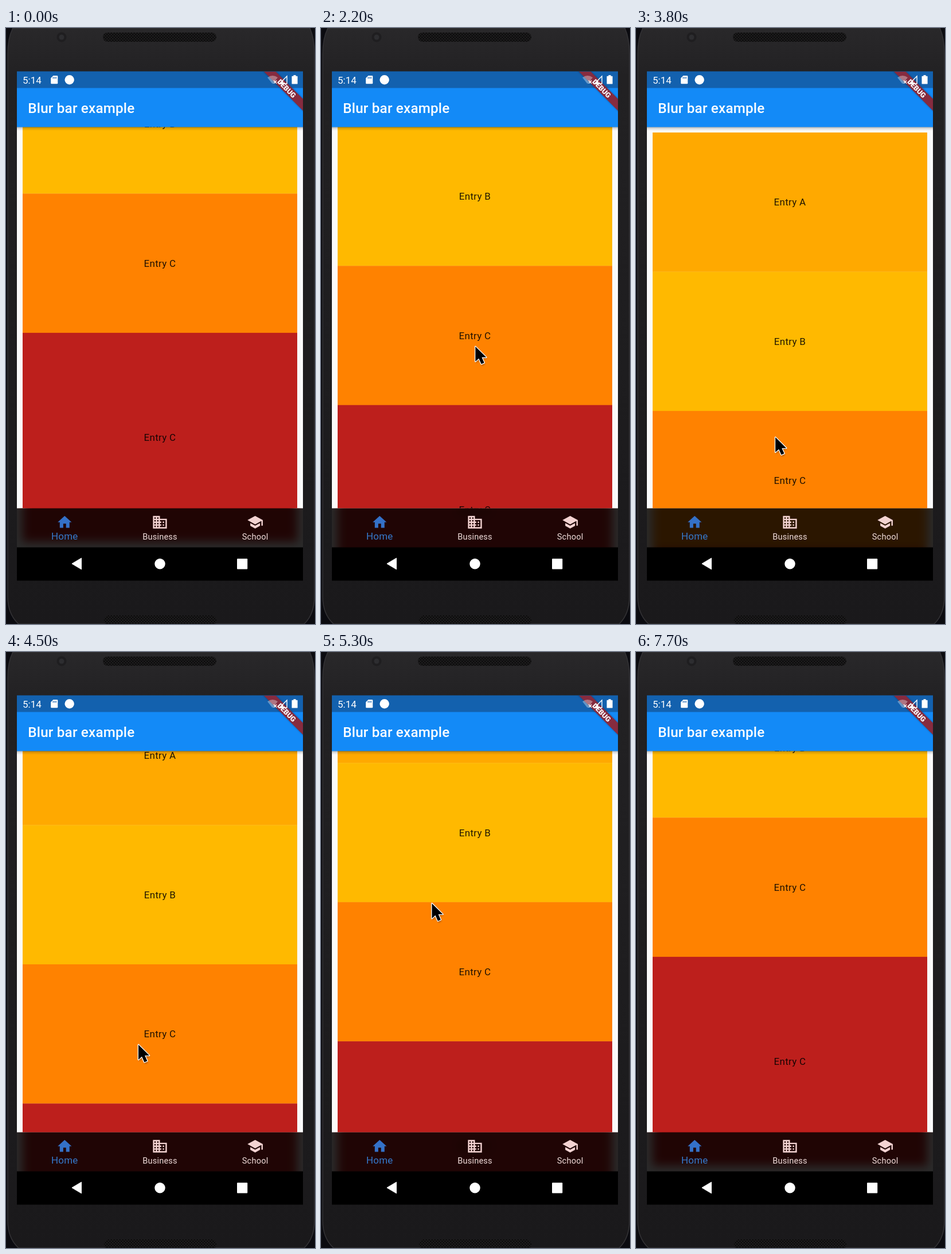
An HTML page that plays this animation: 539x1038 px, repeating every 7800 ms.

```html
<!DOCTYPE html>
<html lang="en">
<head>
<meta charset="utf-8">
<title>Blur bar example</title>
<style>
  html, body { margin: 0; width: 100%; height: 100%; overflow: hidden; background: #0b0b10; }
  svg { display: block; width: 539px; height: 1038px; font-family: Roboto, sans-serif; }
  .entry { font-size: 16.97px; letter-spacing: .3px; fill: #000; fill-opacity: .87; text-anchor: middle; }
  .label { font-size: 14.55px; letter-spacing: .22px; fill: #f0dcda; text-anchor: middle; }
  .label.active { font-size: 16.97px; fill: #3579cc; }
</style>
</head>
<body>
<svg viewBox="0 0 539 1038">
  <defs>
    <linearGradient id="shell" x2="0" y2="1">
      <stop offset="0" stop-color="#29282a"/>
      <stop offset=".08" stop-color="#222123"/>
      <stop offset=".9" stop-color="#1b1a1c"/>
      <stop offset="1" stop-color="#1a191b"/>
    </linearGradient>
    <linearGradient id="shade" x2="0" y2="1">
      <stop offset="0" stop-opacity=".34"/>
      <stop offset=".4" stop-opacity=".13"/>
      <stop offset="1" stop-opacity="0"/>
    </linearGradient>
    <pattern id="mesh" width="5" height="5" patternUnits="userSpaceOnUse">
      <rect width="5" height="5" fill="#1d1c1d"/>
      <circle cx="1.25" cy="1.25" r="1.2" fill="#080808"/>
      <circle cx="3.75" cy="3.75" r="1.2" fill="#080808"/>
    </pattern>
    <filter id="blur" filterUnits="userSpaceOnUse" x="-10" y="760" width="560" height="200" color-interpolation-filters="sRGB">
      <feGaussianBlur stdDeviation="8"/>
    </filter>
    <filter id="soft" x="-50%" y="-50%" width="200%" height="200%"><feGaussianBlur stdDeviation="1.5"/></filter>
    <clipPath id="page"><rect x="19" y="172" width="499" height="664.5"/></clipPath>
    <clipPath id="bar"><rect x="19" y="836.5" width="499" height="68.5"/></clipPath>
    <clipPath id="screen"><rect x="19" y="76" width="499" height="886"/></clipPath>
    <path id="arrow" d="M0 0V26L6 20.6 10.4 30.4 15.4 28.2 11.1 18.8H19Z"/>
  </defs>

  <rect width="539" height="1038" fill="#0b0b10"/>
  <path d="M12 0Q3 18 3 45V990Q3 1021 22 1038H520Q538 1021 538 990V45Q538 18 530 0Z" fill="url(#shell)" stroke="#343336" stroke-width="1.5"/>
  <rect x="169" y="8" width="198" height="16" rx="8" fill="url(#mesh)"/>
  <rect x="171" y="1023" width="196" height="17" rx="8" fill="url(#mesh)"/>
  <circle cx="97" cy="16" r="8.5" fill="#1f1e20"/>
  <circle cx="97" cy="16" r="4.5" fill="#2d2d30"/>

  <rect x="19" y="76" width="499" height="886" fill="#fafafa"/>
  <g clip-path="url(#page)"><g id="list"></g></g>
  <rect x="19" y="172" width="499" height="7" fill="url(#shade)"/>

  <g clip-path="url(#bar)">
    <g filter="url(#blur)">
      <rect x="-40" y="720" width="620" height="280" fill="#fafafa"/>
      <use href="#list"/>
    </g>
    <rect x="19" y="836" width="499" height="69" fill-opacity=".83"/>
  </g>
  <g id="tabs"></g>

  <rect x="19" y="904.5" width="499" height="58"/>
  <g fill="#fff">
    <path d="M115 933 131.5 923.2V942.8Z" stroke="#fff" stroke-linejoin="round"/>
    <circle cx="268.5" cy="933.3" r="9.2"/>
    <rect x="403" y="924.2" width="18.2" height="18.2" rx="1"/>
  </g>

  <rect x="19" y="104" width="499" height="68.5" fill="#138af7"/>
  <rect x="19" y="75.5" width="499" height="29" fill="#1361ae"/>
  <text x="38.3" y="147.6" font-size="24.25" font-weight="500" letter-spacing=".18" fill="#fff">Blur bar example</text>
  <g clip-path="url(#screen)">
    <g transform="translate(489.6 105.3) rotate(45)">
      <rect x="-80" y="-7.3" width="160" height="14.6" filter="url(#soft)" opacity=".35"/>
      <rect x="-80" y="-7.3" width="160" height="14.6" fill="#862b3f"/>
      <text y="4.4" font-size="12.37" font-weight="900" fill="#fff" text-anchor="middle">DEBUG</text>
    </g>
  </g>
  <g fill="#fff">
    <text x="29" y="97" font-size="17">5:14</text>
    <path d="M82.4 83H89Q90.3 83 90.3 84.3V96Q90.3 97.3 89 97.3H79.5Q78.2 97.3 78.2 96V87.2Z"/>
    <path d="M82.3 85.2v3M84.8 85.2v3M87.3 85.2v3" stroke="#1361ae" stroke-width="1.2"/>
    <circle cx="110.7" cy="90.3" r="8.2"/>
    <path d="M456 86.3Q465 79.5 474 86.3L465 97.5Z" opacity=".35"/>
    <path d="M467 91.5l5 5m0-5l-5 5" stroke="#fff" stroke-width="1.5"/>
    <path d="M490 84V97H477Z" fill="none" stroke="#fff" stroke-width="1.4"/>
    <path d="M483.5 90.5V97.5H476.5Z"/>
    <path d="M501.5 82h4v1.7h2.3q.8 0 .8.8v12.2q0 .9-.8.9h-8.5q-.8 0-.8-.9V84.5q0-.8.8-.8h2.2z"/>
  </g>

  <g id="cursor">
    <use href="#arrow" x="1" y="2.5" filter="url(#soft)" opacity=".4"/>
    <use href="#arrow" stroke="#fff" stroke-width="2.6" stroke-linejoin="round"/>
    <use href="#arrow"/>
  </g>
</svg>
<script>
(() => {
  const LOOP = 7800, STEP = 100, DP = 1.2123;
  const byId = id => document.getElementById(id);
  const list = byId('list'), cursor = byId('cursor');

  const entries = [
    ['Entry A', 200, '#ffa900'],
    ['Entry B', 200, '#ffb900'],
    ['Entry C', 200, '#ff8200'],
    ['Entry C', 300, '#bd1f1c']
  ];
  let rows = '', y = 182;
  for (const [name, size, color] of entries) {
    const height = size * DP;
    rows += `<rect x="29" y="${y}" width="479" height="${height + .3}" fill="${color}"/>
      <text class="entry" x="268.5" y="${y + height / 2 + 6.2}">${name}</text>`;
    y += height;
  }
  list.innerHTML = rows;

  const tab = (name, x, labelY, style, color, icon) =>
    `<path transform="translate(${x - 12 * DP} 846.2) scale(${DP})" d="${icon}" fill="${color}"/>
     <text class="${style}" x="${x}" y="${labelY}">${name}</text>`;
  byId('tabs').innerHTML =
    tab('Home', 102.3, 891, 'label active', '#3471c8', 'M10 20v-6h4v6h5v-8h3L12 3 2 12h3v8z') +
    tab('Business', 268.5, 891.3, 'label', '#f3d3d2', 'M12 7V3H2v18h20V7H12zM6 19H4v-2h2v2zm0-4H4v-2h2v2zm0-4H4V9h2v2zm0-4H4V5h2v2zm4 12H8v-2h2v2zm0-4H8v-2h2v2zm0-4H8V9h2v2zm0-4H8V5h2v2zm10 12h-8v-2h2v-2h-2v-2h2v-2h-2V9h8v10zm-2-8h-2v2h2v-2zm0 4h-2v2h2v-2z') +
    tab('School', 434.6, 891.3, 'label', '#f3d3d2', 'M5 13.18v4L12 21l7-3.82v-4L12 17l-7-3.82zM12 3L1 9l11 6 9-4.91V17h2V9L12 3z');

  // Rows: time, values…
  const scrollTrack = [
    [0, 378.5], [1800, 378.5], [2800, 64], [3100, 0], [3900, 0],
    [4500, 123], [5300, 231.3], [6000, 339.7], [6500, 378.5], [LOOP, 378.5]
  ];
  const pointerTrack = [
    [0, 560, 560], [1100, 560, 560], [1600, 270.5, 486], [1800, 270.5, 486],
    [2800, 267.5, 658], [3200, 262, 700], [3900, 240, 715], [4500, 231, 684],
    [5300, 193.5, 438], [5600, 186, 560], [6000, 171.5, 521], [6500, 169, 482],
    [7200, -40, 520], [LOOP, -40, 520]
  ];

  function sample(track, t) {
    const next = track.findIndex(row => row[0] > t);
    const [from, ...start] = track[next - 1];
    const [to, ...end] = track[next];
    const k = (t - from) / (to - from);
    return start.map((v, i) => v + (end[i] - v) * k);
  }

  function draw() {
    const t = Math.floor(performance.now() % LOOP / STEP) * STEP;
    list.setAttribute('transform', `translate(0 ${-sample(scrollTrack, t)[0]})`);
    cursor.setAttribute('transform', `translate(${sample(pointerTrack, t)})`);
    requestAnimationFrame(draw);
  }
  draw();
})();
</script>
</body>
</html>
```
